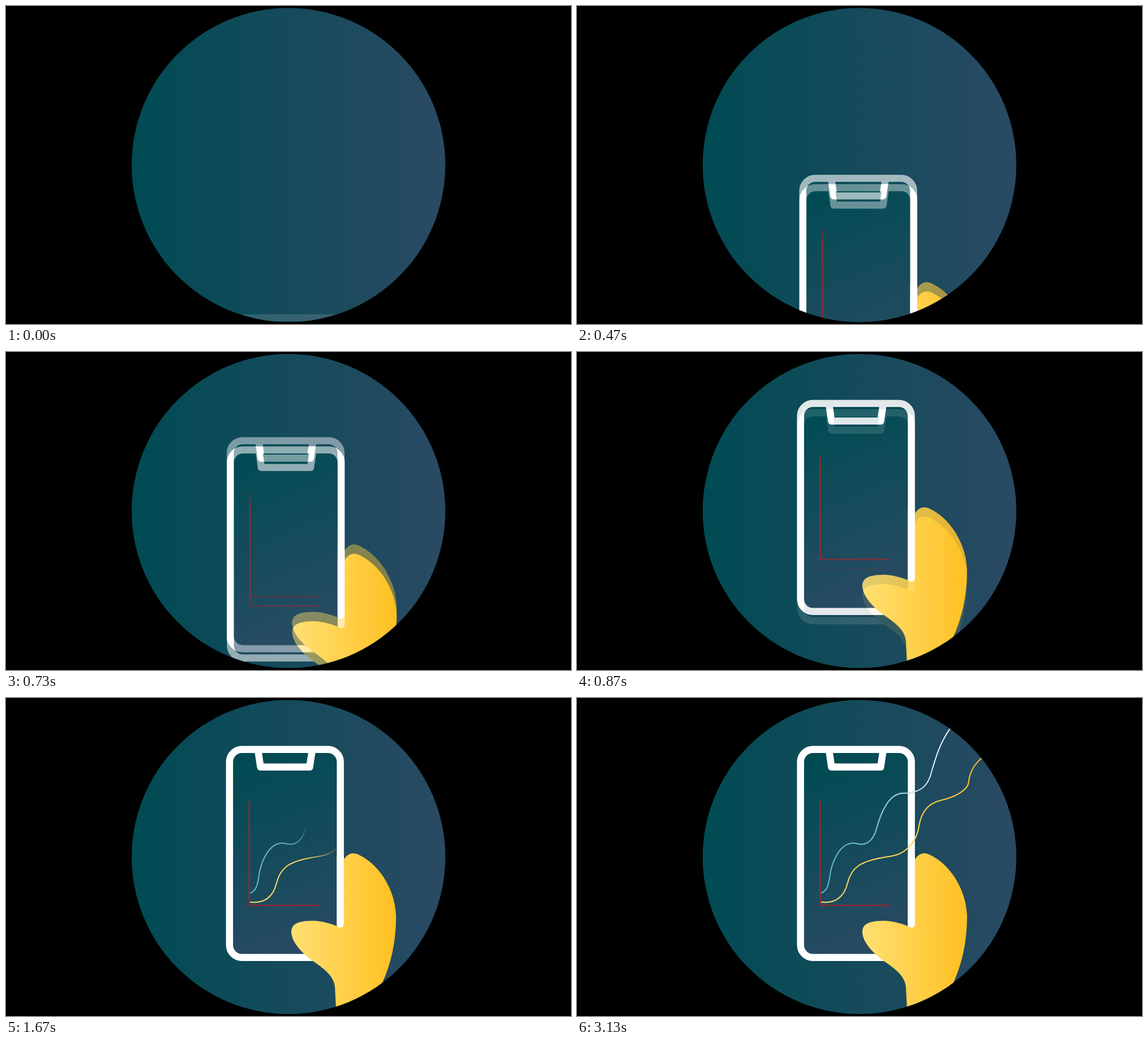
Recreate the animation shown at these times as an HTML page. Size 998 by 561 pixels, loop 3.19 s.

```html
<!DOCTYPE html>
<html lang="en">
<head>
<meta charset="utf-8">
<title>Phone chart</title>
<style>
  html, body { margin: 0; width: 100%; height: 100%; overflow: hidden; background: #000; }
  svg { display: block; width: 100%; height: 100%; }
  .blend { isolation: isolate; }
  .blend use { mix-blend-mode: plus-lighter; }
</style>
</head>
<body>
<svg viewBox="0 0 998 561">
  <defs>
    <clipPath id="disc"><circle cx="499" cy="280.5" r="277"/></clipPath>
    <linearGradient id="sea" gradientUnits="userSpaceOnUse" x1="222" x2="776" y1="0" y2="0">
      <stop stop-color="#004b53"/><stop offset="1" stop-color="#2a4a63"/>
    </linearGradient>
    <linearGradient id="screen" gradientUnits="userSpaceOnUse" x1="425" y1="110" x2="560" y2="437">
      <stop stop-color="#004b53"/><stop offset="1" stop-color="#2a4a63"/>
    </linearGradient>
    <linearGradient id="skin" gradientUnits="userSpaceOnUse" x1="504" x2="689" y1="0" y2="0">
      <stop stop-color="#ffe072"/><stop offset="1" stop-color="#ffc021"/>
    </linearGradient>
    <linearGradient id="gold" gradientUnits="userSpaceOnUse" x1="431" x2="716" y1="0" y2="0">
      <stop stop-color="#ffe072"/><stop offset="1" stop-color="#ffc42c"/>
    </linearGradient>
    <linearGradient id="ice" gradientUnits="userSpaceOnUse" x1="431" x2="662" y1="0" y2="0">
      <stop stop-color="#62b8c4"/><stop offset=".3" stop-color="#6fbdc8"/><stop offset="1" stop-color="#fff"/>
    </linearGradient>
    <linearGradient id="feather" gradientUnits="userSpaceOnUse">
      <stop stop-color="#fff"/><stop offset="1" stop-color="#fff" stop-opacity="0"/>
    </linearGradient>
    <mask id="wipe" maskUnits="userSpaceOnUse" x="0" y="0" width="998" height="561">
      <rect width="998" height="561" fill="url(#feather)"/>
    </mask>

    <g id="device" fill="none" stroke-width="12.5" stroke-linejoin="round">
      <rect x="394.8" y="90.8" width="195.8" height="367" rx="22" fill="url(#screen)" stroke="#fff"/>
      <path d="M445 91L449.5 121.7H536.3L541 91" stroke="#fff"/>
      <path d="M429.5 182V366H553" stroke="#8c2b34" stroke-width="2.5" stroke-linejoin="miter"/>
      <path fill="url(#skin)" d="M590 304C594 284 603 274 613 274C620 274 624 277 628 279
        C664 299 688 343 689 385C689 430 680 470 664 504L650 570H584C583 545 582 530 581 510
        C579 490 562 478 545 466C525 452 504 432 504 412C504 399 516 393 541 393
        C560 393 574 399 584 402L590 402Z"/>
      <path d="M590.6 280V399" stroke="#fff" stroke-linecap="round"/>
    </g>
  </defs>

  <rect width="998" height="561"/>
  <g clip-path="url(#disc)">
    <rect width="998" height="561" fill="url(#sea)"/>
    <g class="blend">
      <use href="#device" id="upper"/>
      <use href="#device" id="lower"/>
    </g>
    <g mask="url(#wipe)" fill="none" stroke-width="2">
      <path stroke="url(#ice)" d="M431 344C441 341 444 331 446 318C450 285 466 256 488 256
        C495 256 495 258 502 258C515 258 524 248 529 231C535 208 549 168 576 168
        C588 168 592 167 600 164C612 160 619 152 624 138C632 111 639 82 659 54L668 42"/>
      <path stroke="url(#gold)" d="M431 360C455 363 472 352 478 326C485 299 500 288 543 281
        C565 278 575 274 584 265C596 254 602 240 604 226C609 196 625 185 641 181
        C668 175 690 163 692 148C693 132 702 116 716 105L724 99"/>
    </g>
  </g>
</svg>
<script>
  const LOOP = 3190, FRAME = 1000 / 15;
  const FEATHER = 56, WIPE_X = 0.54, WIPE_Y = -0.84;
  const el = id => document.getElementById(id);
  const feather = el('feather');
  const set = (node, attrs) => {
    for (const name in attrs) node.setAttribute(name, attrs[name]);
  };

  set(feather, { x1: 0, y1: 0, x2: WIPE_X * FEATHER, y2: WIPE_Y * FEATHER });

  // Frames start on whole hundredths of a second.
  function frameAt(time) {
    const frame = Math.round(time / FRAME);
    return Math.round(frame * FRAME / 10) * 10 > time ? frame - 1 : frame;
  }

  function placeDevice(id, step, opacity) {
    set(el(id), { transform: `translate(${0.31 * step} ${16.4 * step})`, opacity });
  }

  function draw(time) {
    const frame = frameAt(time);

    // The rise is a cross-fade between neighbouring whole steps.
    const steps = Math.max(0, 28.87 - 2.211 * frame);
    const whole = Math.floor(steps), part = steps - whole;
    placeDevice('upper', whole, 1 - part);
    placeDevice('lower', whole + 1, part);

    const start = 98 + 20.8 * (frame - 25) - FEATHER;
    set(feather, { gradientTransform: `translate(${WIPE_X * start} ${WIPE_Y * start})` });
  }

  function tick() {
    draw(performance.now() % LOOP);
    requestAnimationFrame(tick);
  }
  tick();
</script>
</body>
</html>
```
